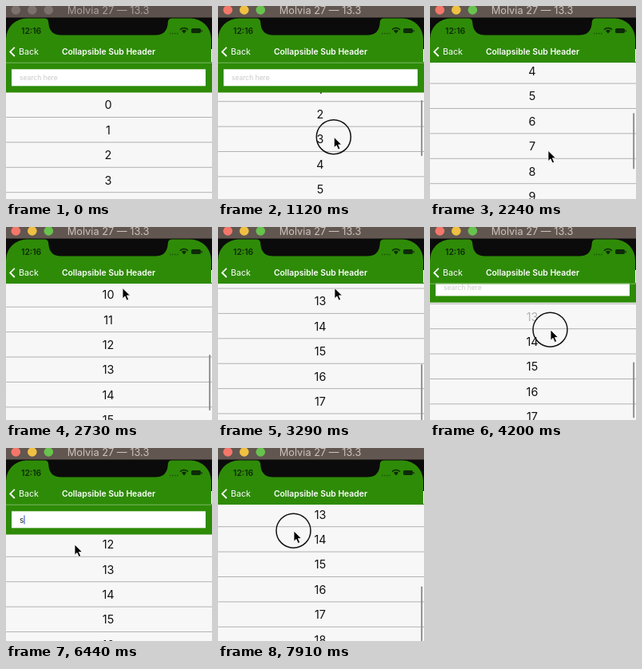
An HTML page for the animation above (8 s loop, 258 by 242 pixels).

```html
<!DOCTYPE html>
<html lang="en">
<head>
<meta charset="utf-8">
<title>Collapsible Sub Header</title>
<style>
html, body { margin: 0; width: 100%; height: 100%; overflow: hidden; background: #000; }
svg { display: block; width: 258px; height: 242px; font-family: Inter, Roboto, sans-serif; }
</style>
</head>
<body>
<svg viewBox="0 0 258 242" xmlns="http://www.w3.org/2000/svg">
  <defs>
    <clipPath id="below"><rect y="70" width="258" height="172"/></clipPath>
  </defs>
  <rect width="258" height="242" fill="#f7f7f7"/>

  <g clip-path="url(#below)">
    <g id="rows" font-size="14.4" fill="#111" text-anchor="middle"></g>
    <g id="sub">
      <rect y="70" width="258" height="38.5" fill="#2e8b07"/>
      <rect x="7" y="79.3" width="243" height="21" fill="#fff"/>
      <text id="hint" x="17" y="93" font-size="8.5" fill="#c9c9c9">search here</text>
      <text id="typed" x="17" y="93.5" font-size="10" fill="#222">s</text>
      <rect id="caret" y="84.5" width="1.2" height="11" fill="#4767c9"/>
    </g>
    <rect id="bar" x="254.2" width="1.9" height="70" rx=".9" fill="#8c8c8c"/>
  </g>

  <rect y="14" width="258" height="40" fill="#0b0b0b"/>
  <path d="M0 70.7V41.5A26 26 0 0 1 26 15.5H48Q53 15.5 53.2 20.5Q54 36.5 69 36.5H187Q202 36.5 202.8 20.5Q203 15.5 208 15.5H231A26 26 0 0 1 257 41.5V70.7Z" fill="#2e8b07"/>
  <path id="line" d="M0 71.2H258" stroke="#7fb768"/>

  <g fill="#0d2b07">
    <text x="19" y="35" font-size="10.4" font-weight="600">12:16</text>
    <path d="M205 34.5H216" stroke="#0d2b07" stroke-width="1.5" stroke-dasharray="1.6 1.4" opacity=".5"/>
    <path d="M220 31Q223 28.4 226 31L223 34.5Z"/>
    <path d="M218 29.6Q223 25.4 228 29.6" fill="none" stroke="#0d2b07" stroke-width="1.4"/>
    <rect x="232" y="28" width="12" height="6" rx="1.8"/>
    <rect x="244.6" y="30" width="1.2" height="2.4"/>
  </g>
  <path d="M10.8 51.8L5.2 57.4L10.8 63" fill="none" stroke="#fff" stroke-width="1.8"/>
  <g fill="#fff">
    <text x="16" y="61.2" font-size="10.7">Back</text>
    <text x="128.5" y="61.2" font-size="10.4" font-weight="600" text-anchor="middle">Collapsible Sub Header</text>
  </g>

  <rect id="chrome" width="258" height="14.5"/>
  <g id="lights"></g>
  <text id="device" x="128" y="10" font-size="12.8" text-anchor="middle">Molvia 27 — 13.3</text>

  <g id="pointer">
    <circle id="touch" cx="-.5" cy="-.3" r="21.5" fill="none" stroke="#111" stroke-width="1.5"/>
    <path transform="scale(.87)" d="M0 0V15.2L3.5 12L6 17.8L8.8 16.6L6.3 10.9H11Z" stroke="#fff"/>
  </g>
</svg>
<script>
const LOOP = 8000, ROW = 31.4, COUNT = 20, SUB = 37.5;
const $ = id => document.getElementById(id);
const set = (el, attrs) => { for (const k in attrs) el.setAttribute(k, attrs[k]); };
const add = (parent, tag, attrs) => {
  const el = document.createElementNS('http://www.w3.org/2000/svg', tag);
  set(el, attrs);
  return parent.appendChild(el);
};

// Progress from 0 to 1 between two times; a power above 1 eases out.
const ramp = (t, from, to, power = 1) =>
  1 - (1 - Math.min(1, Math.max(0, (t - from) / (to - from)))) ** power;
const smooth = p => p * p * (3 - 2 * p);

// Each step takes the pointer to (x, y); with `by` it drags the list,
// and with `rest` the list glides on until that time.
const steps = [
  { from: 70, to: 770, x: 146, y: 196 },
  { from: 980, to: 1400, x: 144, y: 102, by: 168, rest: 2216 },
  { from: 1900, to: 2260, x: 148, y: 182 },
  { from: 2330, to: 2620, x: 146, y: 76.5, by: 276, rest: 3624 },
  { from: 3430, to: 3850, x: 151, y: 102 },
  { from: 4040, to: 4470, x: 151, y: 174, by: -64 },
  { from: 4690, to: 5390, x: 64, y: 98 },
  { from: 5700, to: 6300, x: 86, y: 121 },
  { from: 6860, to: 7420, x: 94, y: 183 },
  { from: 7590, to: 7910, x: 95, y: 104, by: 69 }
];

function gesture(t) {
  let x = 262, y = 150, scroll = 0, touch = false;
  for (const s of steps) {
    const p = ramp(t, s.from, s.to), k = s.by ? p : smooth(p);
    x += (s.x - x) * k;
    y += (s.y - y) * k;
    if (!s.by) continue;
    scroll += s.by * ramp(t, s.from, s.rest || s.to, s.rest ? 3 : 1);
    touch = touch || (t >= s.from - 70 && t < s.to + 90);
  }
  return { x, y, scroll, touch };
}

const rows = Array.from({ length: COUNT }, (_, i) => {
  const y = 124 + ROW * i;
  const label = add($('rows'), 'text', { x: 128, y: y + 5.4 });
  label.textContent = i;
  add($('rows'), 'rect', { y: y + 15, width: 258, height: 1, fill: '#b2b2b2' });
  return label;
});
const colors = ['#f4776a', '#f0c043', '#68c24e'];
const lights = colors.map((_, i) => add($('lights'), 'circle', { cx: 12.3 + 20.5 * i, cy: 5, r: 5.8 }));

function draw(t) {
  const { x, y, scroll, touch } = gesture(t);
  const up = SUB * (ramp(t, 1750, 1960) - ramp(t, 4040, 4295) + ramp(t, 7590, 7770));
  set($('rows'), { transform: `translate(0 ${-scroll})` });
  set(rows[13], { opacity: 1 - 0.8 * (ramp(t, 4000, 4060) - ramp(t, 4170, 4420)) });
  set($('sub'), { transform: `translate(0 ${-up})` });
  set($('line'), { opacity: up < SUB - 1 ? 1 : 0 });
  set($('bar'), {
    y: 111 + scroll * 0.139,
    opacity: ramp(t, 980, 1100) - ramp(t, 5600, 5850) + ramp(t, 7590, 7680)
  });

  const typed = t >= 6370;
  const blink = (t - (typed ? 6370 : 5460)) % 1000 < 500;
  set($('hint'), { opacity: typed ? 0 : 1 });
  set($('typed'), { opacity: typed ? 1 : 0 });
  set($('caret'), { x: typed ? 22.4 : 16.3, opacity: t >= 5460 && blink ? 1 : 0 });

  const active = t >= 560;
  set($('chrome'), { fill: active ? '#625650' : '#5c514c' });
  set($('device'), { fill: active ? '#cbc3be' : '#aaa19c' });
  lights.forEach((c, i) => set(c, { fill: active ? colors[i] : '#7c726d' }));

  set($('pointer'), { transform: `translate(${x} ${y})` });
  set($('touch'), { opacity: touch ? 1 : 0 });
}

const start = performance.now();
function tick() {
  draw((performance.now() - start) % LOOP);
  requestAnimationFrame(tick);
}
tick();
</script>
</body>
</html>
```
